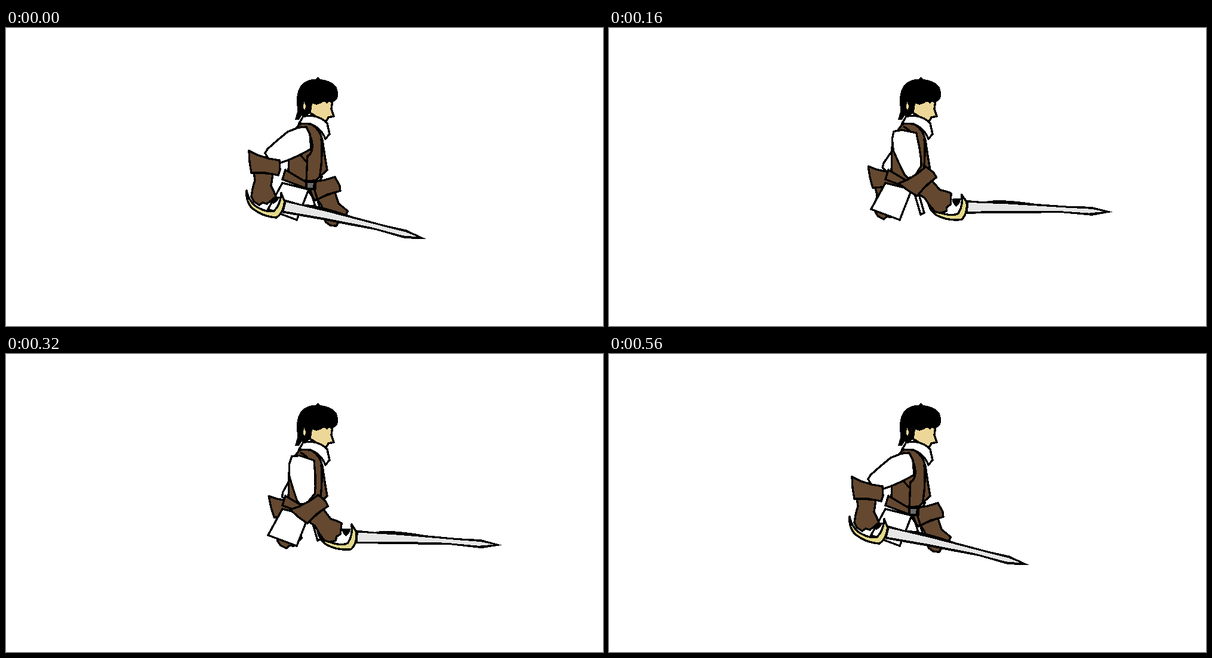
An HTML page that plays this animation: 1000 px wide and 500 px high, repeating every 1.04 s.

```html
<!DOCTYPE html>
<html lang="en">
<head>
<meta charset="utf-8">
<title>Sword thrust</title>
<style>
  html, body { margin: 0; width: 100%; height: 100%; overflow: hidden; background: #fff; }
  svg { display: block; width: 100vw; height: 100vh; }
  path { stroke: #000; stroke-width: 3.4; stroke-linejoin: round; shape-rendering: crispEdges; }
  .leather { fill: #644830; }
  .linen { fill: #fff; }
  .skin { fill: #ecd798; }
  .brass { fill: #e3d98a; }
  .steel { fill: #e6e6e6; stroke: none; }
  .ink { fill: #000; stroke: none; }
  .line { fill: none; }
</style>
</head>
<body>
<svg viewBox="0 0 1000 500">
  <defs>
    <g id="gauntlet" class="leather">
      <path d="M415 242L417 255L413 270L411 283L415 291L424 297L430 293L437 295L441 292L452 283L449 275L444 265L447 245Z"/>
      <path d="M407 206L421 213L440 219L458 222L459 238L456 247L435 243L411 243L408 225Z"/>
    </g>
  </defs>

  <g transform="translate(17 10)">
    <g id="backUpper">
      <path class="linen" d="M500 166L505 190L466 212L452 222L440 220L434 210L438 203L455 188Z"/>
      <g id="backLower"><use href="#gauntlet"/></g>
    </g>
  </g>

  <g id="body">
    <path class="line" d="M510 272L522 313L528 310L517 272"/>
    <path class="linen" d="M463 260L439 304L487 322L507 271Z"/>
    <path class="leather" d="M490 163Q500 156 512 162Q526 170 530 188Q534 215 538 238L520 255L503 258L473 244L474 200L478 180Z"/>
    <path class="line" d="M528 186Q531 220 525 251M503 258L505 214M505 226L490 210M493 165Q512 175 513 196Q514 210 505 215"/>
    <path class="leather" d="M468 238L463 254L500 268L518 270L519 257L500 257Z"/>
    <path d="M503 258H517L515 270H503Z" fill="#6c6c6c"/>
    <path class="skin" d="M512 122L509 142L520 149L536 157L540 150L549 148L545 136L547 122Z"/>
    <path class="linen" d="M498 148L512 147Q530 150 538 160L542 178L535 186Q528 168 510 161L491 160Z"/>
    <path class="ink" d="M522 82L527 86Q546 88 554 100Q558 112 554 120L545 127L541 123L538 127L533 123L528 126L520 129L512 126L509 142L502 150L495 147L491 154L484 154L488 140L487 122Q487 100 500 91Q510 85 518 86Z"/>
    <path class="skin" d="M499 123L502 130L501 138L498 134Z" style="stroke: none"/>
  </g>

  <g id="sword">
    <path class="ink" d="M604 262L620 261L617 269L612 275L606 269Z"/>
    <path class="brass" d="M563 264Q566 283 580 291Q600 300 622 296Q632 286 629 266L620 254Q624 272 616 286Q608 291 592 288Q572 284 563 264Z"/>
    <path class="ink" d="M629 263L660 264Q680 257 745 263L800 264L838 263L874 270L840 278L790 276L740 279L700 281L629 286Z"/>
    <path class="steel" d="M632 267L700 266L800 267L838 267L860 270L835 274L780 273L700 277L632 282Z"/>
  </g>

  <g id="frontUpper">
    <path class="linen" d="M490 167L503 166L509 178L511 203L490 214L472 222L460 226L440 220L434 210L438 203L455 188L472 174Z"/>
    <g id="frontLower"><use href="#gauntlet"/></g>
  </g>
</svg>
<script>
  const LOOP = 1040, STEP = 40;
  const SHOULDER = [495, 187], ELBOW = [433, 234], HAND = [431, 289], GRIP = [594, 273];

  // Absolute angles in degrees at each time
  const POSES = [
    { t: 0,   upper: 0,   lower: 0,   blade: 14,  backUpper: -69, backLower: -26 },
    { t: 80,  upper: -35, lower: -21, blade: 9,   backUpper: -41, backLower: -17 },
    { t: 200, upper: -94, lower: -63, blade: 0,   backUpper: 0,   backLower: 0 },
    { t: 320, upper: -67, lower: -45, blade: 4.3, backUpper: -20, backLower: -8 },
    { t: 400, upper: -46, lower: -28, blade: 7.5, backUpper: -32, backLower: -13 },
    { t: 480, upper: -21, lower: -13, blade: 11,  backUpper: -56, backLower: -20 },
    { t: 560, upper: 0,   lower: 0,   blade: 14,  backUpper: -69, backLower: -26 }
  ];

  const el = id => document.getElementById(id);
  const spin = (id, angle, pivot) =>
    el(id).setAttribute("transform", `rotate(${angle} ${pivot[0]} ${pivot[1]})`);

  function rotate([x, y], [cx, cy], deg) {
    const a = deg * Math.PI / 180, c = Math.cos(a), s = Math.sin(a);
    return [cx + (x - cx) * c - (y - cy) * s, cy + (x - cx) * s + (y - cy) * c];
  }

  function poseAt(t) {
    const last = POSES[POSES.length - 1];
    if (t >= last.t) return last;
    const i = POSES.findIndex(p => p.t > t);
    const a = POSES[i - 1], b = POSES[i], k = (t - a.t) / (b.t - a.t);
    const pose = {};
    for (const key in a) pose[key] = a[key] + (b[key] - a[key]) * k;
    return pose;
  }

  function draw(t) {
    const p = poseAt(t);
    spin("frontUpper", p.upper, SHOULDER);
    spin("frontLower", p.lower - p.upper, ELBOW);
    spin("backUpper", p.backUpper, SHOULDER);
    spin("backLower", p.backLower - p.backUpper, ELBOW);

    // The sword follows the fist but keeps its own angle
    const elbow = rotate(ELBOW, SHOULDER, p.upper);
    const reach = rotate(HAND, ELBOW, p.lower);
    const x = elbow[0] + reach[0] - ELBOW[0] - GRIP[0];
    const y = elbow[1] + reach[1] - ELBOW[1] - GRIP[1];
    el("sword").setAttribute("transform",
      `translate(${x} ${y}) rotate(${p.blade} ${GRIP[0]} ${GRIP[1]})`);
  }

  const start = performance.now();
  function tick() {
    const t = (performance.now() - start) % LOOP;
    draw(Math.floor(t / STEP) * STEP);
    requestAnimationFrame(tick);
  }
  draw(0);
  requestAnimationFrame(tick);
</script>
</body>
</html>
```
